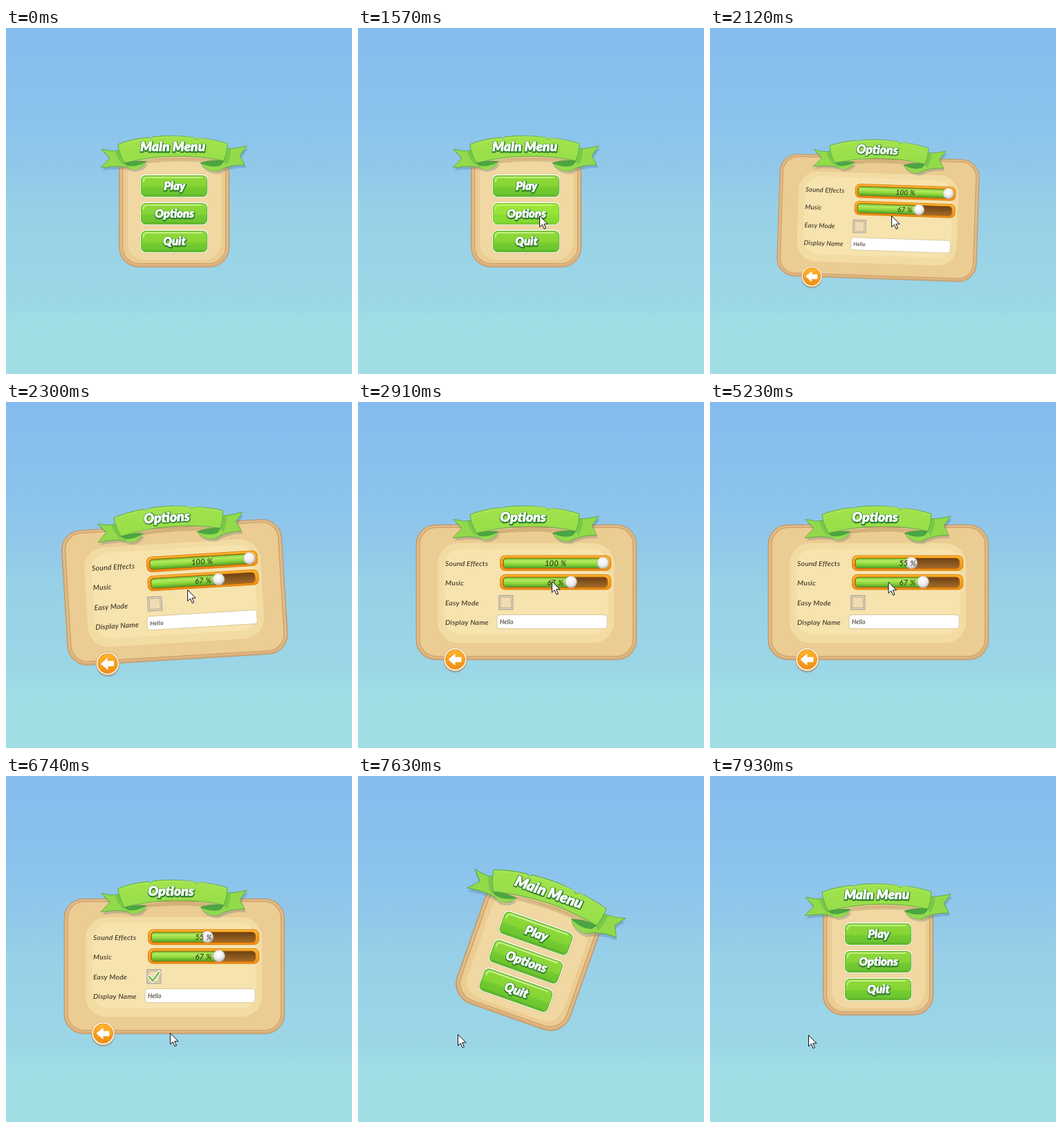
An HTML page that plays this animation: 500 px wide and 500 px high, repeating every 8000 ms.

```html
<!DOCTYPE html>
<html lang="en">
<head>
<meta charset="utf-8">
<title>Game menu</title>
<style>
html, body { margin: 0; width: 100%; height: 100%; overflow: hidden; }
svg { display: block; width: 100vw; height: 100vh; }
text { font-family: Lato, "Open Sans", sans-serif; font-style: italic; }
.big { font-weight: 900; text-anchor: middle; fill: #fff; stroke: #fff; stroke-width: .7; stroke-linejoin: round; }
.edge { fill: #2c7d27; stroke: #2c7d27; stroke-width: 3; }
.label { font-size: 10.4px; font-weight: 400; letter-spacing: .25px; fill: #2a2218; }
.mid { text-anchor: middle; font-size: 11px; }
</style>
</head>
<body>
<svg viewBox="0 0 500 500" xmlns="http://www.w3.org/2000/svg">
  <defs>
    <linearGradient id="sky" x2="0" y2="1">
      <stop offset="0" stop-color="#84bcef"/><stop offset=".15" stop-color="#88c0ed"/>
      <stop offset=".3" stop-color="#8dc4ec"/><stop offset=".42" stop-color="#92c9e9"/>
      <stop offset=".53" stop-color="#98d0e7"/><stop offset=".79" stop-color="#9cd7e6"/>
      <stop offset=".84" stop-color="#a0dde4"/><stop offset="1" stop-color="#a1dee4"/>
    </linearGradient>
    <linearGradient id="leaf" x2="0" y2="1">
      <stop offset="0" stop-color="#8fd93a"/><stop offset=".5" stop-color="#86d534"/>
      <stop offset=".58" stop-color="#74cb30"/><stop offset="1" stop-color="#69c12f"/>
    </linearGradient>
    <linearGradient id="fill" x2="0" y2="1">
      <stop offset="0" stop-color="#6fb92c"/><stop offset=".25" stop-color="#b3ec62"/>
      <stop offset=".6" stop-color="#8fd83b"/><stop offset="1" stop-color="#4f9f25"/>
    </linearGradient>
    <linearGradient id="groove" x2="0" y2="1">
      <stop offset="0" stop-color="#6d4113"/><stop offset="1" stop-color="#a26a2a"/>
    </linearGradient>
    <linearGradient id="amber" x2="0" y2="1">
      <stop offset="0" stop-color="#ffb62e"/><stop offset="1" stop-color="#f18c12"/>
    </linearGradient>
    <radialGradient id="pearl" cx=".45" cy=".35" r=".65">
      <stop offset="0" stop-color="#fff"/><stop offset=".6" stop-color="#ececee"/>
      <stop offset="1" stop-color="#b9b9bd"/>
    </radialGradient>
    <linearGradient id="ribbon" x2="0" y2="1">
      <stop offset="0" stop-color="#a2e34c"/><stop offset="1" stop-color="#96de4a"/>
    </linearGradient>
    <path id="tails" d="M138 175Q152 179 164 177L174 196L203 193Q196 205 182 204Q170 197 137 202L150 188ZM348 170.500Q330 175 316 174L312 192L281 195Q288 207 306 207Q322 197 345 198L338 184Z"/>
    <g id="banner">
      <use href="#tails" y="4" x="2" fill="#33506b" opacity=".22"/>
      <path d="M168 196Q243 180 319 193L318 198Q243 186 170 201Z" fill="#8a6432" opacity=".25"/>
      <use href="#tails" fill="#93da4b" stroke="#56a945" stroke-width=".9"/>
      <path d="M158 178L164 177L172 195L170 199Q160 190 158 178ZM325 174.500H318L314 192L319 198Q325 187 325 174.500Z" fill="#62b848" opacity=".5"/>
      <path d="M171 195Q190 191 202 193Q197 200 186 202Q177 202 171 195ZM315 192Q295 190 282 195Q286 202 300 204Q309 202 315 192Z" fill="#4ba542" stroke="#42973c" stroke-width=".7"/>
      <path d="M172 198Q184 203 202 194Q194 206 181 204.500ZM313 197Q302 204 282 196Q290 208 306 206.500Z" fill="#94db4e"/>
      <path d="M162 168Q182 160 206 158L209 160L213 157Q243 154 271 158L275 161L279 159Q302 161 320 167Q320 180 315 192Q243 177 171 195Q163 181 162 168Z" fill="url(#ribbon)" stroke="#56a945" stroke-width=".9"/>
      <path d="M164 169Q200 158 243 157Q285 157 318 168" fill="none" stroke="#bced76" stroke-width=".9" opacity=".7"/>
    </g>
    <path id="arrow" d="M0 0V16.2L3.8 12.6L6.6 19L9 18L6.3 11.7H11.5Z" fill="#fff" stroke="#111" stroke-width="1" stroke-linejoin="round"/>
  </defs>

  <rect width="500" height="500" fill="url(#sky)"/>

  <g id="options">
    <g id="optBoard"></g>
    <rect x="115" y="204" width="255" height="144" rx="30" fill="#f3dca3"/>
    <rect x="125" y="212" width="236" height="124" rx="24" fill="#f6e3ae"/>
    <text class="label" x="126" y="237">Sound Effects</text>
    <text class="label" x="126" y="265">Music</text>
    <text class="label" x="126" y="294">Easy Mode</text>
    <text class="label" x="126" y="322">Display Name</text>
    <g id="sliders"></g>
    <rect x="203" y="279" width="21.5" height="21.5" rx="1" fill="#b5aa98"/>
    <rect x="204.5" y="280.5" width="18.5" height="18.5" fill="#e9e2d6"/>
    <rect x="206" y="282" width="15.5" height="15.5" fill="#efdcb2" stroke="#bba985" stroke-width="1"/>
    <g id="tick" fill="none" stroke-linejoin="round" stroke-linecap="round">
      <path d="M207 290L212 296L221 284" stroke="#fff" stroke-width="5"/>
      <path d="M207 290L212 296L221 284" stroke="#72b843" stroke-width="2.6"/>
    </g>
    <rect x="201" y="307.500" width="159" height="20" rx="4" fill="#fff" stroke="#d9c79b" stroke-width="1"/>
    <text class="label" x="205" y="321" style="font-size:8.6px">Hello</text>
    <use href="#banner" y="-5.500"/>
    <text class="big" x="238.500" y="173" font-size="19.500">Options</text>
    <g id="back">
      <circle cx="140.500" cy="374" r="17" fill="#7d5a2a" opacity=".35"/>
      <circle cx="140.500" cy="372" r="16.500" fill="#fff6e2" stroke="#c9a878" stroke-width=".8"/>
      <circle cx="140.500" cy="372" r="14" fill="url(#amber)" stroke="#e88a18" stroke-width="1"/>
      <path d="M131 372L140 364.500V369H149V375.500H140V380Z" fill="#fff" stroke="#fff" stroke-width="1" stroke-linejoin="round"/>
    </g>
  </g>

  <g id="main">
    <g id="mainBoard"></g>
    <rect x="176" y="190" width="135" height="145" rx="24" fill="#f1d8a2"/>
    <g id="buttons"></g>
    <use href="#banner"/>
    <text class="big" x="241" y="178" font-size="19.200">Main Menu</text>
  </g>

  <use id="cursor" href="#arrow"/>
</svg>
<script>
const $ = id => document.getElementById(id);
const LOOP = 8000;

const board = (x, y, w, h) => `
  <rect x="${x}" y="${y}" width="${w}" height="${h}" rx="28" fill="#d9ad78" stroke="#b98f60" stroke-width=".8"/>
  <rect x="${x + 1.5}" y="${y + 1}" width="${w - 3}" height="${h - 4}" rx="27" fill="#e2bb86"/>
  <rect x="${x + 5}" y="${y + 4}" width="${w - 10}" height="${h - 9}" rx="24" fill="#ebcc92" stroke="#c89a64" stroke-width="1.1"/>`;
$('mainBoard').innerHTML = board(163.5, 180, 159, 165.5);
$('optBoard').innerHTML = board(84, 177.5, 318.5, 195);

$('buttons').innerHTML = ['Play', 'Options', 'Quit'].map((name, i) => `
  <g transform="translate(0 ${i * 40})">
    <rect x="193.500" y="211" width="99" height="34.500" rx="8" fill="#fdfbe6" stroke="#d6c292" stroke-width=".7"/>
    <rect x="195.500" y="213.500" width="95" height="30" rx="6" fill="url(#leaf)" stroke="#58ab34" stroke-width=".9"/>
    <path d="M199 222Q198 216 204 216H283" fill="none" stroke="#d3f59c" stroke-width="1.600" stroke-linecap="round"/>
    <path d="M200 241.500H286" stroke="#55ad2c" stroke-width="1.200"/>
    <rect class="glow" x="195.500" y="213.500" width="95" height="30" rx="6" fill="#b8ff38" opacity="0"/>
    <text class="big" x="243.500" y="234" font-size="16.600">${name}</text>
  </g>`).join('');
const glows = document.querySelectorAll('.glow');

// Dark outline behind the white lettering
document.querySelectorAll('.big').forEach(el => {
  const edge = el.cloneNode(true);
  edge.classList.add('edge');
  edge.setAttribute('transform', 'translate(.3 .5)');
  el.before(edge);
});

$('sliders').innerHTML = [0, 27.5].map(y => `
  <g transform="translate(0 ${y})">
    <rect x="205.500" y="222" width="160" height="21.500" rx="7" fill="url(#amber)" stroke="#d9800f" stroke-width="1"/>
    <rect x="209.500" y="225.500" width="151" height="15" rx="5" fill="url(#groove)" stroke="#b5670c" stroke-width="1"/>
    <rect class="level" x="210.500" y="226" width="0" height="14" rx="4.500" fill="url(#fill)"/>
    <circle class="knob" cy="232.500" r="8.600" fill="url(#pearl)" stroke="#a8a49c" stroke-width=".6"/>
    <text class="label mid value" x="285.500" y="237"></text>
  </g>`).join('');
const levels = document.querySelectorAll('.level');
const knobs = document.querySelectorAll('.knob');
const values = document.querySelectorAll('.value');

function setSlider(i, v) {
  const x = 214 + 1.4 * v;
  levels[i].setAttribute('width', x - 210.5);
  knobs[i].setAttribute('cx', x);
  values[i].textContent = Math.round(v) + ' %';
}

// Rows: time, then values reached at that time
const path = [
  [490, 497, 363], [800, 370, 328], [1090, 286, 304], [1270, 309, 299],
  [1330, 302, 296], [1570, 262.5, 271.5], [2730, 262.5, 271.5], [3270, 315.5, 234.5],
  [3890, 315.5, 234.5], [4310, 291, 235], [4870, 291, 235], [5700, 215, 293],
  [5820, 213, 292], [6450, 213, 292], [6740, 237.5, 371.5], [6900, 212, 387],
  [7210, 144.5, 373.5], [7630, 144.5, 373.5], [7750, 142.5, 374.5]
];
// time, scale, angle
const mainPose = [
  [1790, 1, 0], [1980, .15, -50], [1981, 0, 0], [7540, 0, 0], [7541, .4, -60],
  [7630, 1.09, 19.5], [7690, 1.07, 15], [7750, 1.04, 9], [7810, 1.02, 4.5],
  [7870, 1.005, 1.3], [7930, 1, 0]
];
const optPose = [
  [1980, 0, 70], [2070, .65, 24], [2130, .95, -2], [2190, 1.03, -9],
  [2240, 1.02, -7], [2300, 1, -3.5], [2360, 1, -1.2], [2420, 1, 0],
  [7460, 1, 0], [7540, .35, 45], [7541, 0, 0]
];
const volume = [[3890, 100], [3950, 72], [4310, 55]];

function at(rows, t) {
  if (t <= rows[0][0]) return rows[0].slice(1);
  for (let i = 1; i < rows.length; i++) {
    const a = rows[i - 1], b = rows[i];
    if (t < b[0]) {
      const k = (t - a[0]) / (b[0] - a[0]);
      return a.slice(1).map((v, j) => v + (b[j + 1] - v) * k);
    }
  }
  return rows[rows.length - 1].slice(1);
}

function pose(id, rows, t) {
  const [s, r] = at(rows, t), el = $(id);
  el.style.display = s > 0 ? '' : 'none';
  el.setAttribute('transform', `translate(243 268) rotate(${r}) scale(${s}) translate(-243 -268)`);
}

function draw(t) {
  pose('main', mainPose, t);
  pose('options', optPose, t);

  const [x, y] = at(path, t);
  $('cursor').style.display = t < 490 ? 'none' : '';
  $('cursor').setAttribute('transform', `translate(${x} ${y})`);
  glows.forEach((g, i) => {
    const top = 212 + i * 40;
    const over = t >= 490 && t < 2000 && x > 194 && x < 292 && y > top && y < top + 33;
    g.setAttribute('opacity', over ? .35 : 0);
  });

  setSlider(0, at(volume, t)[0]);
  setSlider(1, 67);
  $('tick').style.display = t >= 6070 ? '' : 'none';
  const press = t >= 7330 && t < 7510 ? .95 : 1;
  $('back').setAttribute('transform', `translate(140.5 372) scale(${press}) translate(-140.5 -372)`);
}

const start = performance.now();
function tick() {
  draw((performance.now() - start) % LOOP);
  requestAnimationFrame(tick);
}
tick();
</script>
</body>
</html>
```
